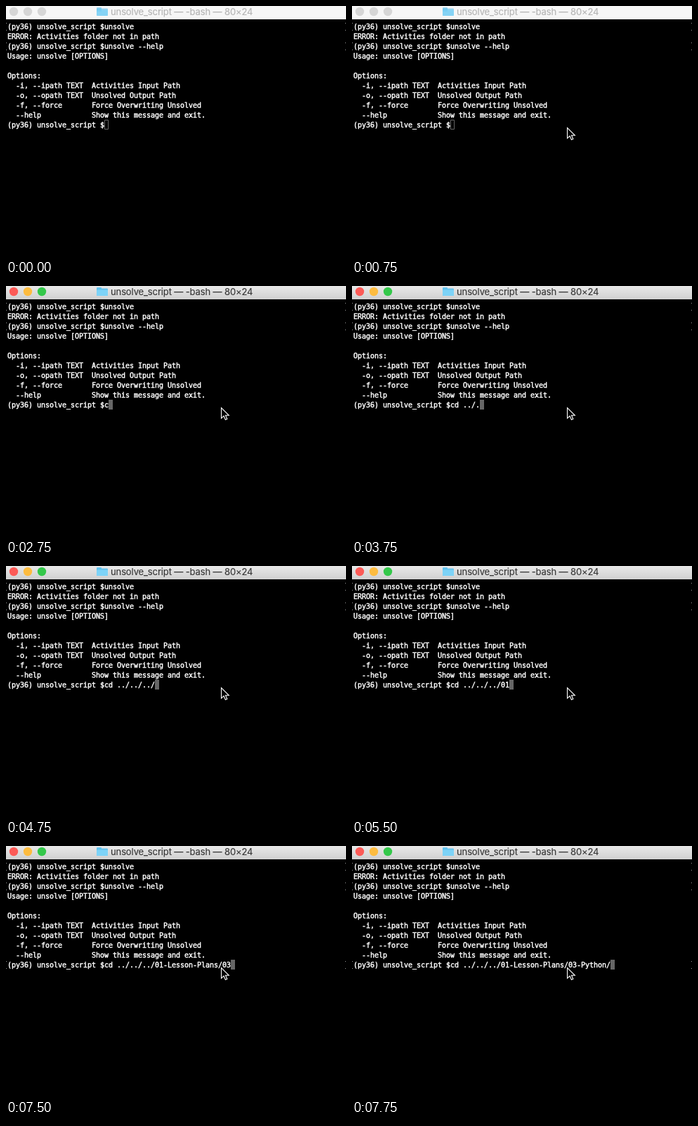
Recreate the animation shown at these times as an HTML page with a canvas. Size 484x359 px, loop 8000 ms.

```html
<!DOCTYPE html>
<html lang="en">
<head>
<meta charset="utf-8">
<title>Terminal session</title>
<style>
  html, body { margin: 0; width: 100%; height: 100%; overflow: hidden; background: #000; }
  canvas { display: block; }
</style>
</head>
<body>
<canvas id="stage" width="484" height="359"></canvas>
<script>
const ctx = document.getElementById('stage').getContext('2d');
const LOOP = 8000, FOCUS = 1250;
const LEFT = 2, TOP = 22, CELL = 6, ROW = 14;
const PROMPT = '(py36) unsolve_script $';
const COMMAND = 'cd ../../../01-Lesson-Plans/03-Python/';
const LINES = [
  PROMPT + 'unsolve',
  'ERROR: Activities folder not in path',
  PROMPT + 'unsolve --help',
  'Usage: unsolve [OPTIONS]',
  '',
  'Options:',
  '  -i, --ipath TEXT  Activities Input Path',
  '  -o, --opath TEXT  Unsolved Output Path',
  '  -f, --force       Force Overwriting Unsolved',
  '  --help            Show this message and exit.'
];
// [time, characters typed]; the long jumps are tab completions
const TYPING = [
  [0, 0], [2750, 1], [3000, 3], [3250, 4], [3500, 5], [3750, 7], [4000, 8], [4250, 9],
  [4500, 10], [4750, 12], [5250, 13], [5500, 14], [5750, 28], [6500, 29], [7500, 30], [7750, 38]
];
const ARROW = new Path2D('M.5 .5V15.5L4 12.2L6.4 17.5L8.8 16.5L6.5 11.3H11.3Z');

function rect(color, x, y, w, h, radius = 0) {
  ctx.fillStyle = color;
  ctx.beginPath();
  ctx.roundRect(x, y, w, h, radius);
  ctx.fill();
}

// A thin outline in the text colour gives the heavier stem weight.
function write(text, x, y, font, color, spacing, weight) {
  ctx.font = font;
  ctx.letterSpacing = spacing;
  ctx.fillStyle = ctx.strokeStyle = color;
  ctx.lineWidth = weight;
  ctx.lineJoin = 'round';
  ctx.fillText(text, x, y);
  ctx.strokeText(text, x, y);
}

function titleBar(active) {
  const shade = ctx.createLinearGradient(0, 0, 0, 19);
  shade.addColorStop(0, active ? '#e8e8e8' : '#f6f6f6');
  shade.addColorStop(1, active ? '#d0d0d0' : '#f6f6f6');
  rect(shade, 0, 0, 484, 19);

  const lights = active ? ['#fc5b57', '#fdbc40', '#34c84a'] : Array(3).fill('#d6d6d6');
  lights.forEach((color, i) => {
    ctx.fillStyle = color;
    ctx.beginPath();
    ctx.arc(11 + 20 * i, 8, 6.2, 0, 7);
    ctx.fill();
  });

  ctx.globalAlpha = active ? 1 : 0.65;
  rect('#62c3ee', 129, 2, 7, 6, 1);
  rect('#62c3ee', 129, 3.5, 16, 10.5, 1);
  rect('#7dd3f7', 129, 5.5, 16, 8.5, 1);
  ctx.globalAlpha = 1;
  write('unsolve_script — -bash — 80×24', 149, 13, '13px Inter, sans-serif',
    active ? '#363636' : '#b4b4b4', '-0.12px', 0.15);
}

// Only the tips of the brackets show at the window edges.
function promptMarks(row) {
  const y = TOP + ROW * row + 2;
  for (const x of [0, 483]) {
    rect('#999', x, y, 1, 1);
    rect('#999', x, y + 10, 1, 1);
  }
}

function terminal(time, active) {
  const typed = TYPING.findLast(([start]) => start <= time)[1];
  const current = PROMPT + COMMAND.slice(0, typed);
  const row = LINES.length;
  const x = LEFT + CELL * current.length, y = TOP + ROW * row;

  if (active) {
    rect('#666', x, y, CELL, ROW);
  } else {
    ctx.strokeStyle = '#666';
    ctx.lineWidth = 1;
    ctx.strokeRect(x + 0.5, y + 0.5, CELL - 1, ROW - 1);
  }
  [...LINES, current].forEach((line, i) =>
    write(line, LEFT, TOP + ROW * i + 11, '10px "DejaVu Sans Mono", monospace', '#fff', '-0.02px', 0.45));

  promptMarks(0);
  promptMarks(2);
  if (time >= 5750) promptMarks(row);
}

function pointer(time) {
  if (time < 500) return;
  ctx.save();
  ctx.translate(...(time < 750 ? [339, 103] : [306, 173]));
  ctx.fillStyle = '#000';
  ctx.fill(ARROW);
  ctx.strokeStyle = '#fff';
  ctx.lineWidth = 1.1;
  ctx.lineJoin = 'miter';
  ctx.stroke(ARROW);
  ctx.restore();
}

function draw() {
  const time = performance.now() % LOOP;
  const active = time >= FOCUS;
  rect('#000', 0, 0, 484, 359);
  titleBar(active);
  terminal(time, active);
  pointer(time);
  requestAnimationFrame(draw);
}
draw();
</script>
</body>
</html>
```
